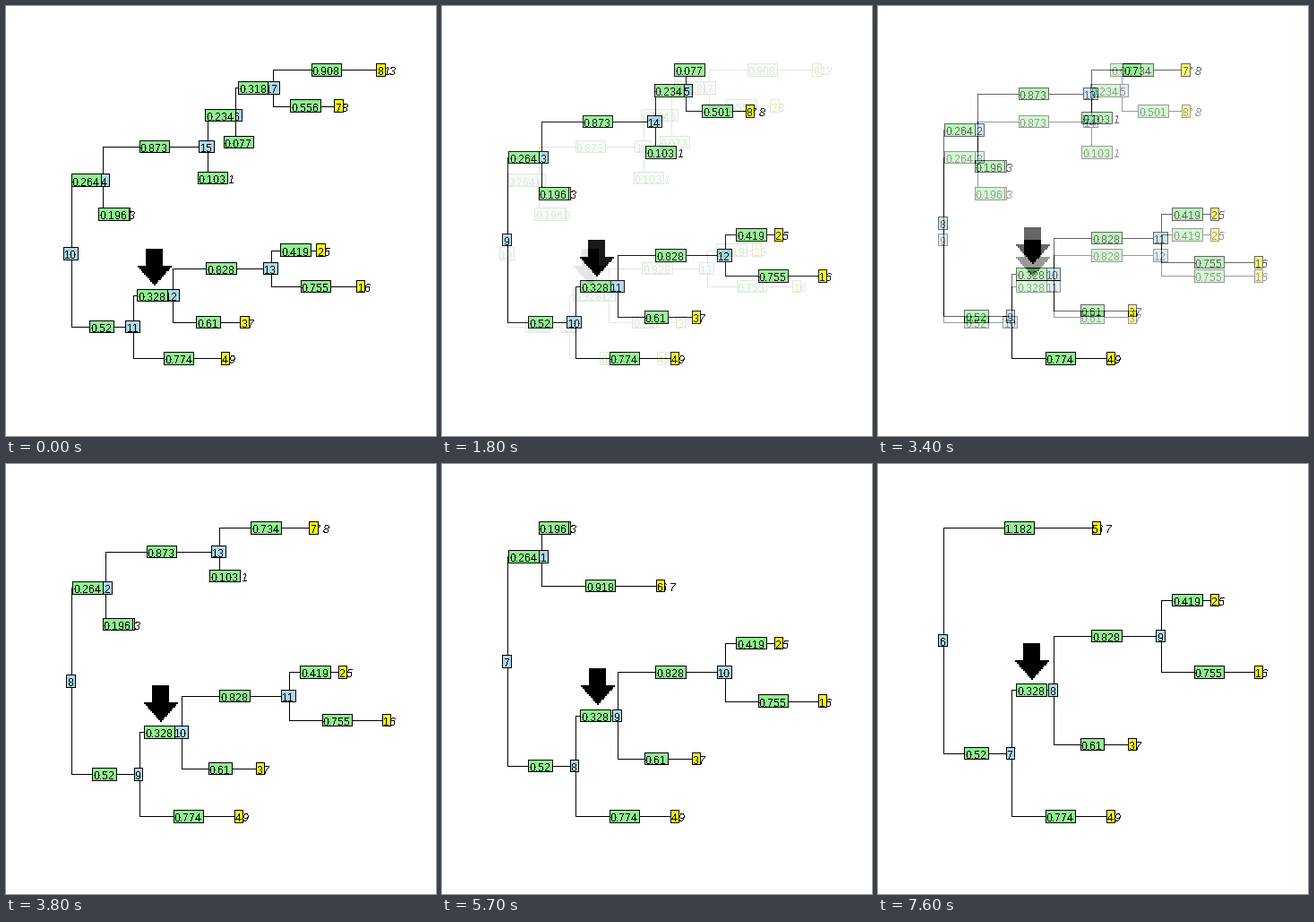
Recreate the animation shown at these times as a matplotlib script. Size 480 by 480 pixels, loop 8000 ms.

```python
import math
from itertools import count

import matplotlib.pyplot as plt
import numpy as np
from matplotlib.animation import FuncAnimation
from matplotlib.patches import Rectangle

plt.rcParams.update({
    "font.family": "Liberation Sans",
    "text.hinting": "native",
    "text.hinting_factor": 1,
    "text.antialiased": False,
})

SIZE, DPI = 480, 96
ROOT_X, TOP, BOTTOM = 73.4, 71.5, 393.5
HOLD, FADE = 10, 9
EDGE_COLOR, NODE_COLOR, TIP_COLOR = "lightgreen", "lightblue", "yellow"

# A tip is (length, number, label); a clade is (length, children), lowest child first.
TIP_1 = (0.103, 6, "2 1")
TIP_3 = (0.196, 5, "3")
LOWER = (0.52, [
    (0.774, 4, "9"),
    (0.328, [
        (0.61, 3, "7"),
        (0.828, [(0.755, 1, "6"), (0.419, 2, "5")]),
    ]),
])
CHERRY = (0.318, [(0.556, 7, "8"), (0.908, 8, "13")])
UPPER = [
    (0.264, [TIP_3, (0.873, [TIP_1, (0.234, [(0.077, 9, ""), CHERRY])])]),
    (0.264, [TIP_3, (0.873, [TIP_1, (0.234, [(0.501, 8, "7 8"), (0.077, 7, "")])])]),
    (0.264, [TIP_3, (0.873, [TIP_1, (0.734, 7, "7 8")])]),
    (0.264, [(0.918, 6, "6 7"), TIP_3]),
    (1.182, 5, "6 7"),
]
SCALES = [133.2] + [144.9] * 4
ARROW_X = [156, 163, 163, 164, 162]

fig = plt.figure(figsize=(SIZE / DPI, SIZE / DPI), dpi=DPI, facecolor="white")
ax = fig.add_axes([0, 0, 1, 1])
layers = count(1)


def pixel(value):
    return math.floor(value + 0.3)


def fill(x, y, width, height, color="black"):
    ax.add_patch(Rectangle((x, y), width, height, facecolor=color, linewidth=0,
                           antialiased=False, zorder=next(layers)))


def write(x, baseline, text, style="normal"):
    ax.text(x, baseline, text, fontsize=9, style=style, ha="left",
            va="baseline", zorder=next(layers))


def box(x, y, text, color):
    text_width = sum(3 if c == "." else 7 for c in text)
    center, half = x - 0.95, text_width / 2 + 1.2
    left, right = math.floor(center - half), math.floor(center + half)
    top, bottom = math.floor(y - 6.8), math.floor(y + 6.6)
    fill(left, top, right - left + 1, bottom - top + 1)
    fill(left + 1, top + 1, right - left - 1, bottom - top - 1, color)
    write(pixel(center - text_width / 2), pixel(y) + 6, text)


def tip_label(x, y, label):
    left, baseline = pixel(x), pixel(y) + 6
    *prefix, name = label.split(" ")
    if prefix:
        write(left, baseline, prefix[0], "italic")
    write(left + (10 if prefix else 3), baseline, name, "italic")


def arrow(x, y):
    fill(x, y, 19, 20)
    for step in range(11):
        half = 19 - 1.8 * step
        left = round(x + 10 - half)
        fill(left, y + 19 + 2 * step, round(2 * half), 2)


def is_tip(node):
    return len(node) == 3


def count_tips(node):
    return 1 if is_tip(node) else sum(map(count_tips, node[1]))


def layout(tree, scale):
    """Place every node; return edges, inner nodes and tips."""
    tips = count_tips(tree)
    spacing = (BOTTOM - TOP) / (tips - 1)
    rows, numbers = count(), count(tips + 1)
    edges, inner, leaves = [], [], []

    def place(node, parent_x):
        x = parent_x + node[0] * scale
        if is_tip(node):
            y = BOTTOM - next(rows) * spacing
            leaves.append((x, y, str(node[1]), node[2]))
        else:
            number = str(next(numbers))
            ys = [place(child, x) for child in node[1]]
            y = sum(ys) / 2
            inner.append((x, y, number, ys))
        if node[0]:
            edges.append((parent_x, x, y, str(node[0])))
        return y

    place(tree, ROOT_X)
    return edges, inner, leaves


def render(upper, scale, arrow_x):
    ax.clear()
    ax.set(xlim=(0, SIZE), ylim=(SIZE, 0))
    ax.axis("off")
    edges, inner, leaves = layout((0, [LOWER, upper]), scale)
    for x0, x1, y, _ in edges:
        fill(pixel(x0), pixel(y), pixel(x1) - pixel(x0) + 1, 1)
    for x, _, _, ys in inner:
        top, bottom = pixel(min(ys)), pixel(max(ys))
        fill(pixel(x), top, 1, bottom - top + 1)
    for x, y, _, label in leaves:
        tip_label(x, y, label)
    for x, y, number, _ in leaves:
        box(x, y, number, TIP_COLOR)
    for x, y, number, _ in inner:
        box(x, y, number, NODE_COLOR)
    for x0, x1, y, text in edges:
        box((x0 + x1) / 2, y, text, EDGE_COLOR)
    arrow_y = next(y for _, _, y, text in edges if text == "0.328")
    arrow(arrow_x, math.floor(arrow_y) - 52)
    fig.canvas.draw()
    return np.asarray(fig.canvas.buffer_rgba())[..., :3] / 255


scenes = [render(*scene) for scene in zip(UPPER, SCALES, ARROW_X)]
ax.remove()
picture = fig.figimage(scenes[0], origin="upper")


def update(frame):
    index, step = divmod(frame, HOLD + FADE)
    mix = max(0, step - HOLD + 1) / (FADE + 1)
    image = scenes[index]
    if mix:
        image = (1 - mix) * image + mix * scenes[index + 1]
    picture.set_data(image)
    return [picture]


anim = FuncAnimation(fig, update, frames=80, interval=100, repeat=True, blit=False)
plt.show()
```
